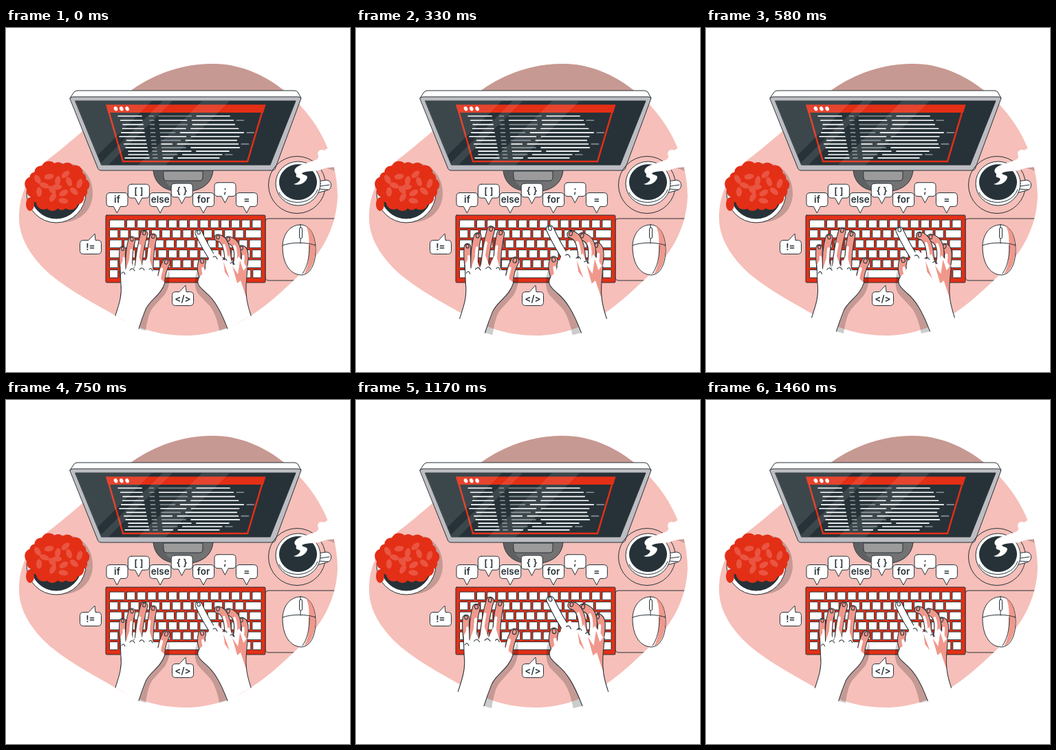
Recreate the animation shown at these times as an HTML page. Size 500x500 px, loop 1.5 s.

```html
<!DOCTYPE html>
<html lang="en">
<head>
<meta charset="utf-8">
<title>Typing code</title>
<style>
  html, body { margin: 0; width: 100%; height: 100%; overflow: hidden; background: #fff; }
  svg { display: block; width: 100vw; height: 100vh; }
  .o { stroke: #263238; stroke-width: 1; stroke-linejoin: round; stroke-linecap: round; }
  .n { fill: none; }
  .w { fill: #fff; }
  .d { fill: #263238; }
  .r { fill: #e32f16; }
  .s { fill: #f0988c; }
  .shade { fill: #000; opacity: .2; }
  #hands, #code { stroke-linecap: round; }
  text { font: 600 13.5px Inter, "Open Sans", sans-serif; fill: #263238; text-anchor: middle; }
</style>
</head>
<body>
<svg viewBox="0 0 500 500">
  <defs>
    <path id="blob" d="M19 276C19 240 33 214 60 192C86 172 112 150 135 128C150 113 166 101 183 90C217 66 258 52 300 52C340 52 375 68 403 90C450 126 482 185 482 245C480 290 460 329 418 367C398 386 378 404 356 418C325 438 292 447 262 447C222 447 188 436 159 418C130 401 94 383 64 358C35 332 19 304 19 276Z"/>
    <clipPath id="inBlob"><use href="#blob"/></clipPath>
    <clipPath id="inScreen"><path d="M101 106H421L384 199H139Z"/></clipPath>
  </defs>

  <use href="#blob" fill="#f6bfb9"/>
  <rect y="40" width="500" height="60" fill="#c69992" clip-path="url(#inBlob)"/>

  <!-- plant -->
  <path class="shade" d="M80 197C108 193 127 215 126 243C124 269 104 283 76 283Z"/>
  <circle class="o w" cx="73" cy="240" r="43"/>
  <circle class="o d" cx="73" cy="240" r="37"/>
  <g id="plant" class="r"></g>

  <!-- monitor -->
  <path class="o" fill="#737373" d="M214 207C216 228 232 238 257 238S299 228 301 207Z"/>
  <path fill="#5f6062" d="M215 208C217 227 232 237 252 237C236 232 228 222 227 208Z"/>
  <path class="o" fill="#9b9b9b" d="M229 208H286V217Q286 222 281 222H234Q229 222 229 217Z"/>
  <path class="o" fill="#bdbdc2" d="M93 102L97 99H425L429 102L391 205Q390 207 387 207H138Q135 207 134 205Z"/>
  <path class="o w" d="M93 102L99 93Q101 91 104 91H419Q422 91 424 93L429 102Q428 100 424 100H98Q94 100 93 102Z"/>
  <path class="o d" d="M101 106H421L384 199H139Z"/>
  <g clip-path="url(#inScreen)">
    <path class="n" stroke="#e32f16" stroke-width="2.5" d="M147 113H375L351 194H170Z"/>
    <path class="r" d="M145 111.500H377.500L374 123H148.500Z"/>
    <g id="dots" class="w"></g>
    <g id="code" stroke-width="1.700"></g>
    <path fill="#fff" opacity=".1" d="M101 106H212L131 187ZM228 106H242L149 199H135ZM285 106H325L232 199H192Z"/>
  </g>

  <!-- mouse and pad -->
  <path class="o n" clip-path="url(#inBlob)" d="M490 277H381Q377 277 377 281V362Q377 367 382 367H490"/>
  <path class="o w" d="M428 286C444 286 450 305 450 323C450 343 442 359 429 359C411 358 402 340 402 318C402 301 412 286 428 286Z"/>
  <path class="s" d="M436 288C446 293 449.500 309 449.500 323C449 341 442 355 433 358C440 346 441 332 440 317C441 305 440 296 436 288Z"/>
  <path class="o n" d="M402 316C414 311 438 311 450 316M428 286V291M428 306V313M441 316C441 334 438 347 431 357"/>
  <rect class="o w" x="426.500" y="290" width="4" height="16" rx="2"/>

  <!-- coffee -->
  <circle class="o n" cx="423" cy="228" r="41.500"/>
  <path class="o w" d="M453 223L466 221Q473 222 472.500 229Q472 235 466 236L452 240Z"/>
  <path class="o n" d="M456 230L470 228M455 234L468 235"/>
  <ellipse class="o w" cx="424.500" cy="226" rx="32.500" ry="32"/>
  <path class="o n" d="M397 239C404 257 443 261 453 235"/>
  <ellipse class="o d" cx="424.500" cy="224" rx="27" ry="25.500"/>
  <path class="shade" clip-path="url(#inBlob)" d="M455 198C463 206 472 202 484 212V196Z"/>
  <path class="w" d="M418 227C427 230 437 224 438 217C438 213 431 214 430 211C439 206 451 210 463 204C471 202 478 203 483 200V174C474 173 465 174 463 178C456 175 451 180 454 186C455 193 443 193 434 198C424 199 416 206 421 211C424 214 418 216 426 218C430 219 426 225 418 227Z"/>

  <!-- keyboard -->
  <rect class="o r" x="145" y="272" width="232" height="98" rx="1.500"/>
  <g id="keys"></g>

  <g id="bubbles"></g>

  <g id="hands">
    <path class="shade" d="M237 350C239 363 238 376 231 387L213 407C207 415 205 429 203 440L193 437L206 403L230 375ZM278 350C274 364 273 377 279 386L297 405C304 414 308 429 310 440L322 437L306 396L284 376Z"/>
    <g id="fingers"></g>
    <path class="w" d="M159 418C165 400 169 388 167 371L166 346L170 338L174 352L180 334L186 350L193 332L199 348L207 330L213 350L222 362L231 370C226 388 208 396 203 409Q197 424 193 437Z"/>
    <path class="w" d="M356 418C350 400 348 388 349 372L351 350L345 340L338 332L330 345L324 330L318 338L306 325L296 332L288 355L281 362C275 371 282 377 290 384C302 394 311 408 322 437Z"/>
    <path class="s" d="M349 391V372L351 345L345 353L340 338L337 358L329 346L336 371L341 367ZM316 340L325 364L318 355Z"/>
    <path class="o n" d="M159 418C165 400 169 388 167 371L166 346M193 437Q197 424 203 409C208 396 226 388 231 370M356 418C350 400 348 388 349 372L351 348M322 437C311 408 302 394 290 384C282 377 275 371 281 362"/>
    <path class="o n" d="M168 357q3 -5 5 1M180 352q4 -5 7 1M194 351q4 -5 7 1M208 351q3 -4 5 2M301 333q4 -3 6 3M315 337q4 -4 6 1M326 342q4 -3 6 2"/>
  </g>
</svg>
<script>
  const $ = id => document.getElementById(id);
  const list = (n, f) => Array.from({ length: n }, (_, i) => f(i));
  const fill = (id, parts) => { $(id).innerHTML = parts.join(""); };
  let seed = 7;
  const rnd = (a, b) => {
    seed = seed * 16807 % 2147483647;
    return a + (b - a) * seed / 2147483647;
  };
  const oval = (x, y, rx, ry, turn = 0, extra = "") =>
    `<ellipse cx="${x}" cy="${y}" rx="${rx}" ry="${ry}" transform="rotate(${turn} ${x} ${y})" ${extra}/>`;

  // plant: a ring of lobes, then paler petals on a spiral
  const lobes = list(17, i => {
    const a = i / 17 * Math.PI * 2 + .3, r = 8 + i % 3 * 1.5;
    return oval(75 + 37 * Math.cos(a), 230 + 27 * Math.sin(a), r, r);
  });
  const petals = list(14, i => {
    const a = i * 2.4, r = 8.5 * Math.sqrt(i);
    return oval(74 + 1.1 * r * Math.cos(a), 231 + .75 * r * Math.sin(a), 7, 4, i * 50, 'fill="#ea5541"');
  });
  fill("plant", [oval(75, 230, 38, 29), ...lobes, oval(35, 256, 6, 10), ...petals]);

  fill("dots", list(3, i => oval(159.5 + 8.3 * i, 117.3, 2.6, 3.3, -30)));

  // code on the screen: three columns that follow the window's slant
  const dash = (x, end, y, dim) => `<path stroke="${dim ? "#879094" : "#fff"}" d="M${x} ${y}H${end}"/>`;
  fill("code", list(12, i => {
    const y = 128 + 6.3 * i - .07 * i * i;
    const end = rnd(325, 362) - 2.5 * i;
    const mid = rnd(245, 280);
    return dash(rnd(160, 171) + .9 * i, 197 + i, y) + dash(208.5 + .5 * i, 214.5 + .5 * i, y, true) +
      dash(222 + .6 * i, mid - 8, y, i % 2 === 0) + dash(mid, end, y) +
      (i % 3 === 1 ? dash(end + 5, end + 15, y, true) : "");
  }));

  // keyboard: each row starts with a key of its own width
  const key = (x, y, w) => `<rect class="o w" x="${x}" y="${y}" width="${w}" height="11.500" rx=".8"/>`;
  const step = 15.2;
  const keys = [22, 12.3, 18, 22, 12.3].flatMap((w, r) => {
    const y = 279 + 14.5 * r, x = 153.5 + w, last = x + 12 * step;
    return [key(150.5, y, w), ...list(12, i => key(x + step * i, y, 12.2)), key(last, y, 371 - last)];
  });
  const bar = 150.5 + 4 * step;
  keys.push(...list(4, i => key(150.5 + step * i, 351.5, 12.2)), key(bar, 351.5, 80),
    ...list(5, i => key(371 - 12.2 - step * i, 351.5, 12.2)));
  fill("keys", keys);

  // speech bubbles: box corner, tail tip, label
  const bubble = (x, y, tx, ty, label) => {
    const up = ty < y, b = y + 20, r = x + 31;
    const top = up ? `H${tx - 9}L${tx} ${ty}L${tx + 1} ${y}` : "";
    const bottom = up ? "" : `H${tx + 5}L${tx} ${ty}L${tx - 5} ${b}`;
    return `<path class="o w" d="M${x + 5} ${y}${top}H${r - 5}Q${r} ${y} ${r} ${y + 5}V${b - 5}Q${r} ${b} ${r - 5} ${b}` +
      `${bottom}H${x + 5}Q${x} ${b} ${x} ${b - 5}V${y + 5}Q${x} ${y} ${x + 5} ${y}Z"/>` +
      `<text x="${x + 15.5}" y="${y + 14.8}">${label}</text>`;
  };
  const words = ["if", "[ ]", "else", "{ }", "for", ";", "="].map((label, i) => {
    const x = 146 + 31.4 * i, y = i % 2 ? 227.7 - .6 * i : 239.5;
    return bubble(x, y, x + 15.3, y + 29.5, label);
  });
  fill("bubbles", [...words, bubble(107.5, 308.5, 129, 299, "!="), bubble(241.5, 383.5, 261, 374, "&lt;/&gt;")]);

  // finger: base, bend, tip, width and the side its highlight lies on
  const finger = (ex, ey, bx, by, tx, ty, w, side, skin = "#f0988c") => {
    const d = `fill="none" d="M${ex} ${ey}Q${bx} ${by} ${tx} ${ty}"`;
    return `<path ${d} stroke="#263238" stroke-width="${w + 2}"/><path ${d} stroke="${skin}" stroke-width="${w}"/>` +
      `<path ${d} stroke="#fff" stroke-width="${w * .4}" pathLength="1" stroke-dasharray=".65 2" transform="translate(${side * w * .25})"/>` +
      oval(tx, ty - 1, w * .25, w * .32, side * -15, 'class="o n"');
  };
  fill("fingers", [
    finger(172, 358, 168, 338, 169.5, 322, 8, 1),
    finger(179, 352, 178, 325, 183, 308, 9, 1),
    finger(192, 350, 195, 318, 201, 299, 9, -1),
    finger(209, 354, 209, 325, 214, 304, 9, -1),
    finger(225, 370, 226, 354, 233, 341, 10, -1),
    finger(344, 355, 351, 322, 342, 321, 9, -1),
    finger(335, 345, 341, 312, 323, 308, 9, -1),
    finger(323, 345, 323, 308, 308, 305, 9, -1),
    finger(304, 340, 291, 322, 280, 298, 9, 1, "#fff"),
    finger(289, 367, 281, 352, 285, 340, 10, 1)
  ]);

  // hands swell twice per loop, with a rest between
  const draw = ms => {
    const s = 1 + .108 * Math.abs(Math.cos((ms - 425) / 750 * Math.PI)) ** 3;
    $("hands").setAttribute("transform", `translate(257.5 366) scale(${s}) translate(-257.5 -366)`);
  };

  let start;
  const tick = now => {
    start ??= now;
    draw((now - start) % 1500);
    requestAnimationFrame(tick);
  };
  draw(0);
  requestAnimationFrame(tick);
</script>
</body>
</html>
```
